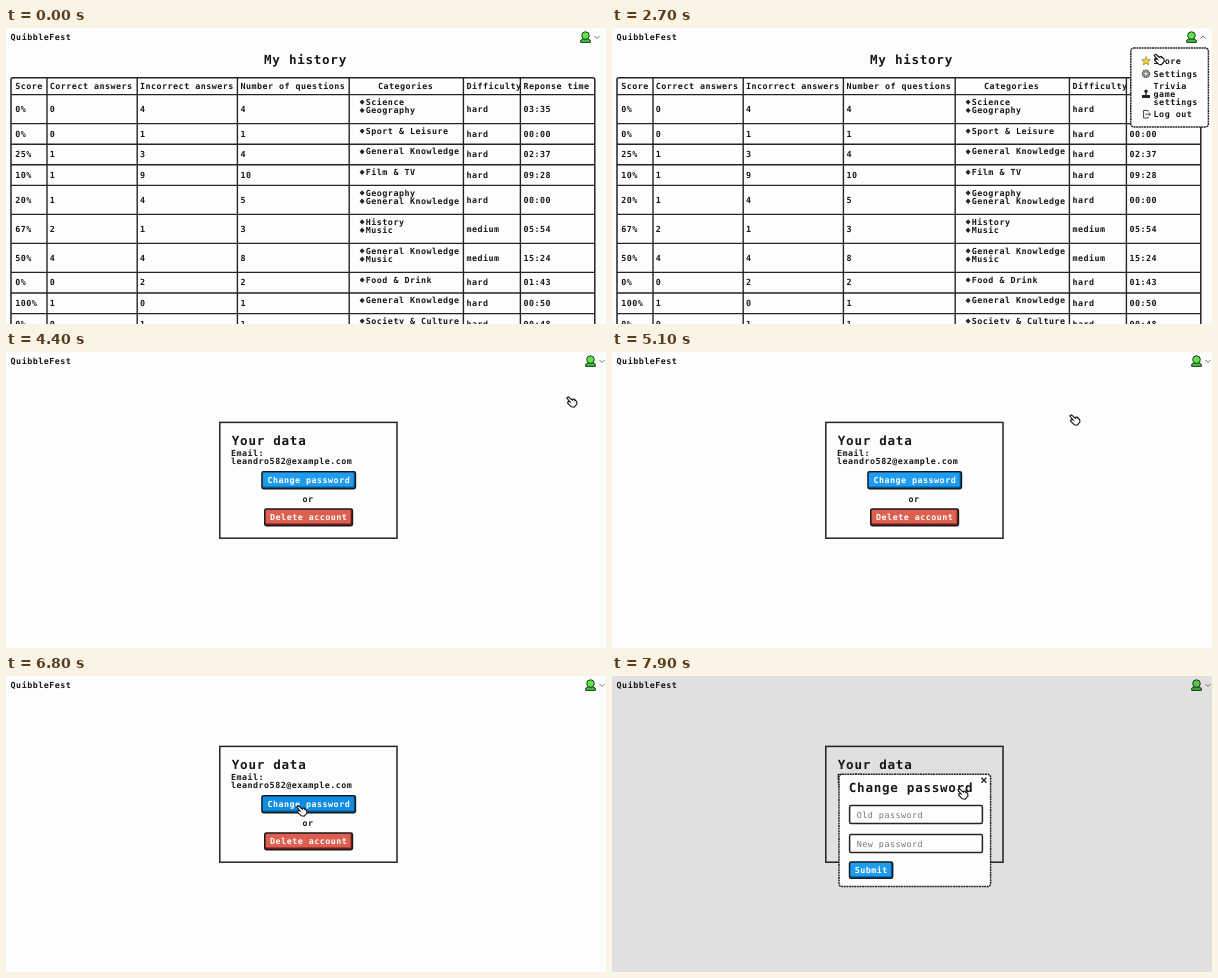
Animation of 600 by 296 pixels, one loop 8000 ms. Source, as an HTML page:

```html
<!DOCTYPE html>
<html lang="en">
<head>
<meta charset="utf-8">
<title>Quiz history</title>
<style>
  html, body { margin: 0; width: 100%; height: 100%; overflow: hidden; background: #fefdfe; }
  svg { display: block; width: 600px; height: 296px; }
  text {
    font: bold 8.4px "DejaVu Sans Mono", "Liberation Mono", monospace;
    letter-spacing: .0565em;
    fill: #16181b;
    white-space: pre;
    text-rendering: geometricPrecision;
  }
  .big { font-size: 12.6px; }
  .light { fill: #fff; }
  .hint { fill: #777; font-weight: normal; }
</style>
</head>
<body>
<svg id="stage" viewBox="0 0 600 296"></svg>
<script>
(() => {
const NS = "http://www.w3.org/2000/svg";
const INK = "#212529";
const CHAR = 5.53;
const LOOP = 8000;
const stage = document.getElementById("stage");

function el(parent, tag, attrs = {}) {
  const node = document.createElementNS(NS, tag);
  for (const key in attrs) node.setAttribute(key, attrs[key]);
  parent.appendChild(node);
  return node;
}
const group = parent => el(parent, "g");

// y is the middle of the capitals
function label(parent, x, y, str, cls = "") {
  const drop = cls === "big" ? 4.6 : 3.06;
  el(parent, "text", { x, y: y + drop, class: cls }).textContent = str;
}

function box(parent, x, y, w, h, attrs = {}) {
  return el(parent, "rect", {
    x, y, width: w, height: h, fill: "#fefdfe", stroke: INK, "stroke-width": 1.5, ...attrs
  });
}

function line(parent, d, attrs = {}) {
  return el(parent, "path", { d, fill: "none", stroke: INK, "stroke-width": 1.4, ...attrs });
}

function dashedPanel(parent, x, y, w, h) {
  box(parent, x, y, w, h, { rx: 3, "stroke-dasharray": "2 .6" });
}

function button(parent, x, y, w, h, str, face, shade) {
  box(parent, x, y, w, h, { rx: 1.5, fill: shade, stroke: "#16181b", "stroke-width": 1.6 });
  const front = el(parent, "rect", {
    x: x + .8, y: y + .8, width: w - 2.6, height: h - 3, fill: face
  });
  label(parent, x + (w - str.length * CHAR) / 2 + .2, y + h / 2, str, "light");
  return front;
}

// Header: brand, avatar and arrow
function header(parent, right) {
  label(parent, 4.6, 9, "QuibbleFest");
  const x = right - 11.5;
  el(parent, "path", {
    d: `M${x - 4.8} 14.4v-2.2l2.6-1.4h4.4l2.6 1.4v2.2z`,
    fill: "#3fbf3a", stroke: "#1c3a1c", "stroke-width": 1
  });
  el(parent, "circle", {
    cx: x, cy: 7.6, r: 3.8, fill: "#62e04e", stroke: "#1c3a1c", "stroke-width": 1
  });
  return line(parent, arrowPath(right, false), { stroke: "#777", "stroke-width": 1 });
}

function arrowPath(x, up) {
  return up ? `M${x - 2.5} 10.5l2.5-2.5l2.5 2.5` : `M${x - 2.5} 8l2.5 2.5l2.5-2.5`;
}

// History page
const GK = "General Knowledge";
const rows = [
  ["0%", 0, 4, 4, ["Science", "Geography"], "hard", "03:35"],
  ["0%", 0, 1, 1, ["Sport & Leisure"], "hard", "00:00"],
  ["25%", 1, 3, 4, [GK], "hard", "02:37"],
  ["10%", 1, 9, 10, ["Film & TV"], "hard", "09:28"],
  ["20%", 1, 4, 5, ["Geography", GK], "hard", "00:00"],
  ["67%", 2, 1, 3, ["History", "Music"], "medium", "05:54"],
  ["50%", 4, 4, 8, [GK, "Music"], "medium", "15:24"],
  ["0%", 0, 2, 2, ["Food & Drink"], "hard", "01:43"],
  ["100%", 1, 0, 1, [GK], "hard", "00:50"],
  ["0%", 0, 1, 1, ["Society & Culture"], "hard", "00:48"]
];
const heads = ["Score", "Correct answers", "Incorrect answers", "Number of questions",
  "Categories", "Difficulty", "Reponse time"];
const cols = [9.3, 43.8, 134, 234.4, 372, 460.4, 517.4];

const historyPage = group(stage);
const arrow = header(historyPage, 591);
label(historyPage, 258, 31.2, "My history", "big");
box(historyPage, 5, 49.8, 583.8, 270, { rx: 2, fill: "none" });
for (const x of [41, 131.2, 231.4, 343.2, 457.4, 514.4]) line(historyPage, `M${x} 50V296`);
heads.forEach((h, i) => label(historyPage, cols[i], 58.4, h));

let rowY = 66.6;
for (const row of rows) {
  const height = row[4].length > 1 ? 29 : 20.6;
  const y = rowY;
  line(historyPage, `M5 ${y}H588.8`);
  row.forEach((cell, i) => {
    if (i !== 4) return label(historyPage, cols[i], y + height / 2 - .4, String(cell));
    cell.forEach((name, k) => {
      const mid = y + 7.2 + k * 8.3;
      el(historyPage, "path", { d: `M353.6 ${mid + .3}l2.5-2.7l2.5 2.7l-2.5 2.7z`, fill: INK });
      label(historyPage, 359.8, mid, name);
    });
  });
  rowY += height;
}

// Account menu
const menu = group(historyPage);
dashedPanel(menu, 518.8, 20, 77.6, 79);
label(menu, 541.6, 33, "Score");
label(menu, 541.6, 45.8, "Settings");
["Trivia", "game", "settings"].forEach((s, i) => label(menu, 541.6, 58 + i * 8.2, s));
label(menu, 541.6, 86.3, "Log out");

let star = "";
for (let i = 0; i < 10; i++) {
  const r = i % 2 ? 2 : 4.6, a = i * Math.PI / 5;
  star += `${i ? "L" : "M"}${534 + r * Math.sin(a)} ${33.2 - r * Math.cos(a)}`;
}
el(menu, "path", { d: star + "z", fill: "#f6d02f", stroke: "#8a7420", "stroke-width": .6 });
el(menu, "circle", {
  cx: 534, cy: 45.8, r: 3.4, fill: "none", stroke: "#555", "stroke-width": 1.8, "stroke-dasharray": "1.6 .5"
});
el(menu, "circle", { cx: 534, cy: 45.8, r: 2.1, fill: "#ddd", stroke: "#666", "stroke-width": .9 });
line(menu, "M534 63v5");
el(menu, "circle", { cx: 534, cy: 63.3, r: 1.7, fill: INK });
el(menu, "rect", { x: 530, y: 67, width: 8, height: 3, fill: INK });
line(menu, "M536 83.6v-1.2h-4.4v7.6h4.4v-1.2M533.4 86.2h5M536.8 84.6l1.7 1.6l-1.7 1.6",
  { stroke: "#444", "stroke-width": 1 });

// Settings page
const settingsPage = group(stage);
header(settingsPage, 596);
box(settingsPage, 213.8, 70.4, 177.2, 115.8);
label(settingsPage, 225.8, 88, "Your data", "big");
label(settingsPage, 225, 101, "Email:");
label(settingsPage, 225, 109.4, "leandro582@example.com");
const change = { x: 256, y: 119.8, w: 93.4, h: 16.8 };
const changeFace = button(settingsPage, change.x, change.y, change.w, change.h,
  "Change password", "#209cee", "#006bb3");
label(settingsPage, 296.6, 146.6, "or");
button(settingsPage, 258.8, 157, 87.6, 16.6, "Delete account", "#dd5f50", "#8c2022");

// Password dialog
const dialog = group(stage);
el(dialog, "rect", { width: 600, height: 296, fill: "#000", "fill-opacity": .115 });
dashedPanel(dialog, 227, 98.2, 151.6, 112.4);
label(dialog, 236.8, 111.2, "Change password", "big");
line(dialog, "M369.4 101.8l5 5m0-5l-5 5", { "stroke-width": 1.3 });
["Old password", "New password"].forEach((s, i) => {
  box(dialog, 237.6, 129.6 + i * 29, 132.8, 18, { rx: 1.5 });
  label(dialog, 244.8, 138.6 + i * 29, s, "hint");
});
button(dialog, 237.6, 186, 43, 16.2, "Submit", "#209cee", "#006bb3");

// Cursors
const cursor = group(stage);
const cursorStyle = { fill: "#fff", stroke: "#111", "stroke-width": 1.1, "stroke-linejoin": "round" };
function hand(outline, knuckles) {
  const g = group(cursor);
  el(g, "path", { d: outline, ...cursorStyle });
  line(g, knuckles, { stroke: "#111", "stroke-width": .8 });
  return g;
}
const tilted = hand("M.8 2L2.6 .8L5.6 3.6L8 3L10.6 5.4L11 8L8.2 11.2L5.4 10.8L1.6 7.2L2 5.6L4 5.8Z",
  "M5.6 3.6l1.6 1.6M8 3.4l1.2 1.8M4 5.8l1.4 1.2");
const upright = hand("M3 .8h2v4l6 1.4v4l-1.6 2.2h-5L.6 8V6.2l2.4 .8z",
  "M5 4.8v2.4M7.2 5.6v2M9.2 6v2");

// time, x, y
const path = [
  [300, 562, 65], [400, 562, 17], [500, 562, 16], [1200, 588, 6], [1300, 588, 6],
  [1500, 586, 6], [2400, 586, 6], [2800, 533, 29], [3100, 571, 11], [3500, 571, 11],
  [4000, 560, 44], [4400, 560, 44], [5100, 457, 62], [5200, 452, 66],
  [5600, 326, 108], [5700, 326, 108], [6000, 300, 141], [6100, 300, 141],
  [6700, 290, 129], [7400, 290, 129], [7900, 345, 112]
];

function cursorAt(t) {
  let i = 0;
  while (i < path.length - 2 && t >= path[i + 1][0]) i++;
  const [t0, x0, y0] = path[i], [t1, x1, y1] = path[i + 1];
  const p = Math.min(1, Math.max(0, (t - t0) / (t1 - t0)));
  const e = p * p * (3 - 2 * p);
  return [x0 + (x1 - x0) * e, y0 + (y1 - y0) * e];
}

function show(node, on) {
  node.setAttribute("display", on ? "inline" : "none");
}

function draw() {
  const t = Math.floor(performance.now() % LOOP / 100) * 100;
  const menuOpen = t >= 2200 && t < 4400;
  const [x, y] = cursorAt(t);

  show(historyPage, t < 4400);
  show(menu, menuOpen);
  arrow.setAttribute("d", arrowPath(591, menuOpen));
  show(settingsPage, t >= 4400);
  show(dialog, t >= 6900);

  const over = x > change.x && x < change.x + change.w && y > change.y && y < change.y + change.h;
  changeFace.setAttribute("fill", over ? "#108de0" : "#209cee");

  show(cursor, t >= 300);
  cursor.setAttribute("transform", `translate(${x} ${y})`);
  const onArrow = t < 2600 && x > 580;
  show(upright, onArrow);
  show(tilted, !onArrow);
  requestAnimationFrame(draw);
}
draw();
})();
</script>
</body>
</html>
```
